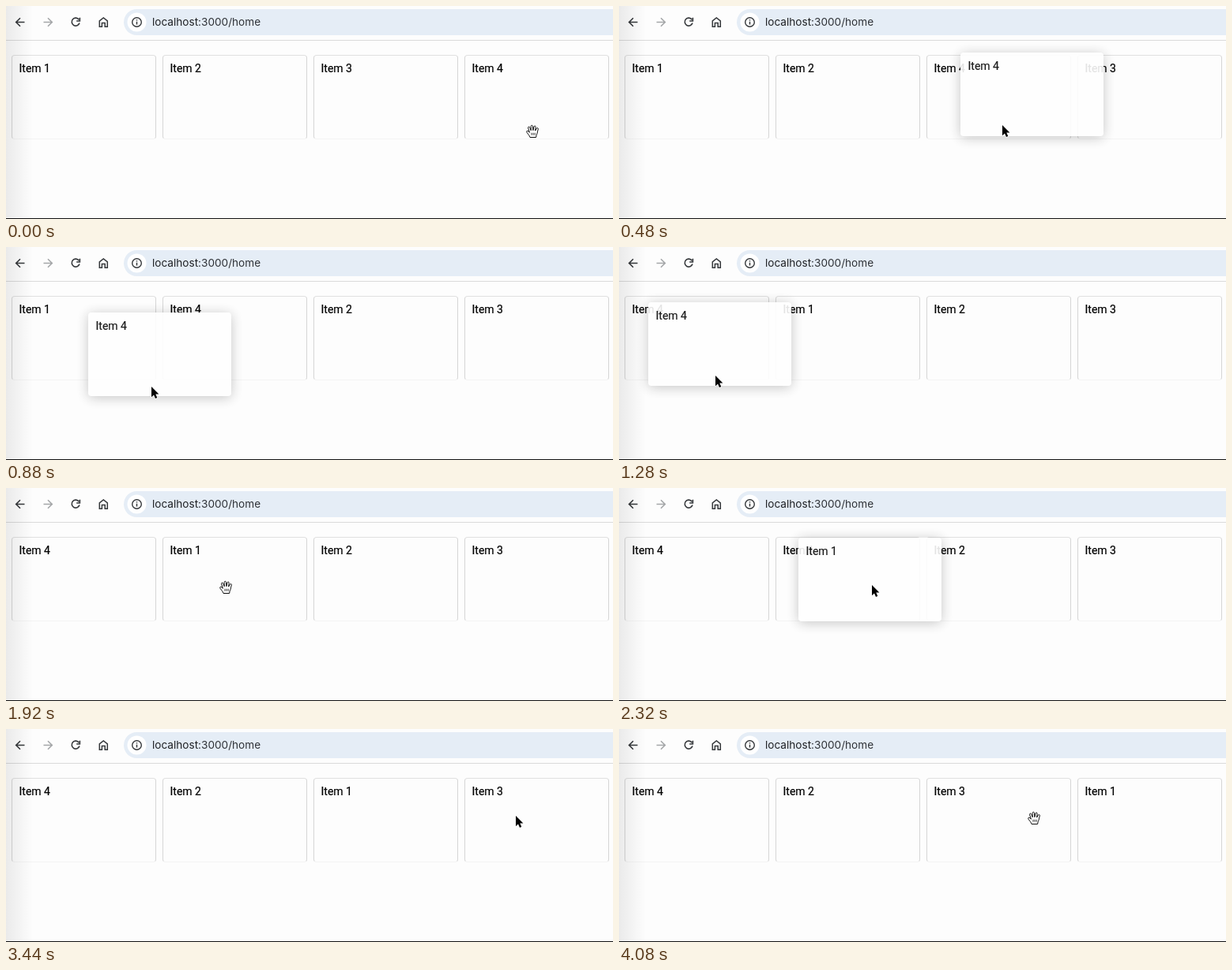
Recreate the animation shown at these times as an HTML page. Size 768x270 px, loop 5600 ms.

```html
<!DOCTYPE html>
<html lang="en">
<head>
<meta charset="utf-8">
<title>Sortable cards</title>
<style>
  html, body { margin: 0; width: 100%; height: 100%; overflow: hidden; background: #fdfdfd; }
  #stage { position: relative; width: 768px; height: 270px; overflow: hidden; }
  #stage > * { position: absolute; left: 0; top: 0; }
  .card {
    box-sizing: border-box; width: 183px; height: 107px; padding: 7px 8.5px;
    border: 1px solid; border-color: #e0e0e0 #d6d6d6 #f4f4f4; border-radius: 4px;
    font: 14px/19px Roboto, sans-serif; color: #000; -webkit-text-stroke: .2px;
  }
  #lifted {
    width: 181px; height: 106px; border-color: transparent; background: #fff;
    opacity: .89; box-shadow: 0 2px 16px rgba(0, 0, 0, .25);
  }
  #shade { width: 34px; height: 270px; background: linear-gradient(90deg, rgba(0, 0, 0, .075), transparent); }
  #floor { width: 768px; height: 1px; margin-top: 269px; background: #111; }
</style>
</head>
<body>
<div id="stage">
  <svg width="768" height="46" fill="none" stroke="#35383b" stroke-width="1.6">
    <path d="M0 43.5H768" stroke="#dadada" stroke-width="1"/>
    <rect x="149" y="4" width="660" height="33" rx="16.5" fill="#e5edf6" stroke="none"/>
    <path d="M23.5 20.5H13M18 15.2L12.7 20.5L18 25.8"/>
    <path d="M47.5 20.5H58M53 15.2L58.3 20.5L53 25.8" stroke="#a5a7a9"/>
    <path d="M92.3 17.2A5 5 0 1 0 93 21.6M93.4 14.8V19H89.2"/>
    <path d="M118.3 18.8L123.3 15L128.3 18.8V26.2H125.2V21.6H121.4V26.2H118.3Z" stroke-width="1.5"/>
    <circle cx="165.5" cy="20.5" r="12" fill="#fff" stroke="none"/>
    <circle cx="165.5" cy="20.5" r="5.8" stroke-width="1.4"/>
    <path d="M165.5 19.7V23.6M165.5 17.2V18.6" stroke-width="1.5"/>
    <text x="185" y="25.2" font-family="Inter, sans-serif" font-size="13.6" fill="#1f2124" stroke="none">localhost<tspan fill="#303338">:3000/home</tspan></text>
  </svg>
  <div class="card"></div>
  <div class="card"></div>
  <div class="card"></div>
  <div class="card"></div>
  <div class="card" id="lifted"></div>
  <div id="shade"></div>
  <div id="floor"></div>
  <svg id="pointer" width="24" height="24" overflow="visible" stroke-linejoin="round">
    <g id="hand" transform="translate(-8 -4.5)" fill="#fff" stroke="#000" stroke-width=".95">
      <path d="M5 16C4.5 14 3 12.5 1 9.7C0 8.2 1.6 7 2.8 8.2L4.4 9.8L2.6 4.2C2.2 2.4 4.2 2 4.8 3.6L6.2 7.3V2C6.2.4 8.4.4 8.5 2L8.9 7.2L10 2.4C10.4 1 12.4 1.4 12.2 3L11.6 7.6L13.4 4.6C14.2 3.4 15.8 4.2 15.3 5.6C14.4 8.4 14.6 10.5 13.2 13L12.6 16Z"/>
      <path d="M7 10.3V13.2M9.1 10.3V13.2M11.2 10.3V13.2" stroke-width=".8"/>
    </g>
    <path id="arrow" d="M0 0V13.2L3 10.4L5 15L7.3 14L5.3 9.5H9.4Z" stroke="#fff" stroke-width="1.4" paint-order="stroke"/>
  </svg>
</div>
<script>
const LOOP = 5600, STEP = 80, LAG = 30;
const LEFT = 7, TOP = 62, PITCH = 191;

const easeIn = u => u ** 1.5;
const easeOut = u => 1 - (1 - u) ** 1.5;
const smooth = u => u * u * (3 - 2 * u);

// pointer moves, each from where the last one ended
const home = [666, 155];
const moves = [
  { start: 240, end: 480, to: [485, 151], ease: easeIn },
  { start: 480, end: 880, to: [184, 177], ease: easeOut },
  { start: 880, end: 1280, to: [122, 163], ease: smooth },
  { start: 1600, end: 1920, to: [278, 122], ease: smooth },
  { start: 2160, end: 2640, to: [441, 126], ease: smooth },
  { start: 2880, end: 3280, to: [659, 110], ease: smooth },
  { start: 3400, end: 3600, to: [525, 109], ease: smooth }
];
const drags = [
  { item: 4, from: 3, start: 320, end: 1360 },
  { item: 1, from: 1, start: 2240, end: 2640 },
  { item: 3, from: 3, start: 3440, end: 4000 }
];

const cards = document.querySelectorAll('.card:not(#lifted)');
const [lifted, pointer, hand, arrow] =
  ['lifted', 'pointer', 'hand', 'arrow'].map(id => document.getElementById(id));

const place = (el, x, y) => { el.style.transform = `translate(${Math.round(x)}px, ${Math.round(y)}px)`; };
const show = (el, on) => { el.style.visibility = on ? 'visible' : 'hidden'; };
const slotX = slot => LEFT + PITCH * slot;

function pointerAt(t) {
  let spot = home;
  for (const { start, end, to, ease } of moves) {
    if (t <= start) break;
    const k = ease(Math.min(1, (t - start) / (end - start)));
    spot = spot.map((v, i) => v + (to[i] - v) * k);
  }
  return spot;
}

// the lifted card trails the pointer slightly
function cardAt({ from, start }, t) {
  const [gx, gy] = pointerAt(start - STEP), [x, y] = pointerAt(t - LAG);
  return [slotX(from) + x - gx, TOP + y - gy];
}

function draw(t) {
  let order = [1, 2, 3, 4], active = null;
  for (const drag of drags) {
    if (t < drag.start + STEP) break;
    const [x] = cardAt(drag, Math.min(t, drag.end));
    order = order.filter(n => n !== drag.item);
    order.splice(Math.round((x - LEFT) / PITCH), 0, drag.item);
    if (t < drag.end) active = drag;
  }
  cards.forEach((card, i) => { card.textContent = `Item ${order[i]}`; });

  show(lifted, active);
  if (active) {
    lifted.textContent = `Item ${active.item}`;
    place(lifted, ...cardAt(active, t));
  }

  const pressed = drags.some(d => t >= d.start && t < d.end);
  show(arrow, pressed);
  show(hand, !pressed);
  place(pointer, ...pointerAt(t));
}

function tick() {
  const t = performance.now() % LOOP;
  draw(t - t % STEP);
  requestAnimationFrame(tick);
}

cards.forEach((card, i) => place(card, slotX(i), TOP));
tick();
</script>
</body>
</html>
```
